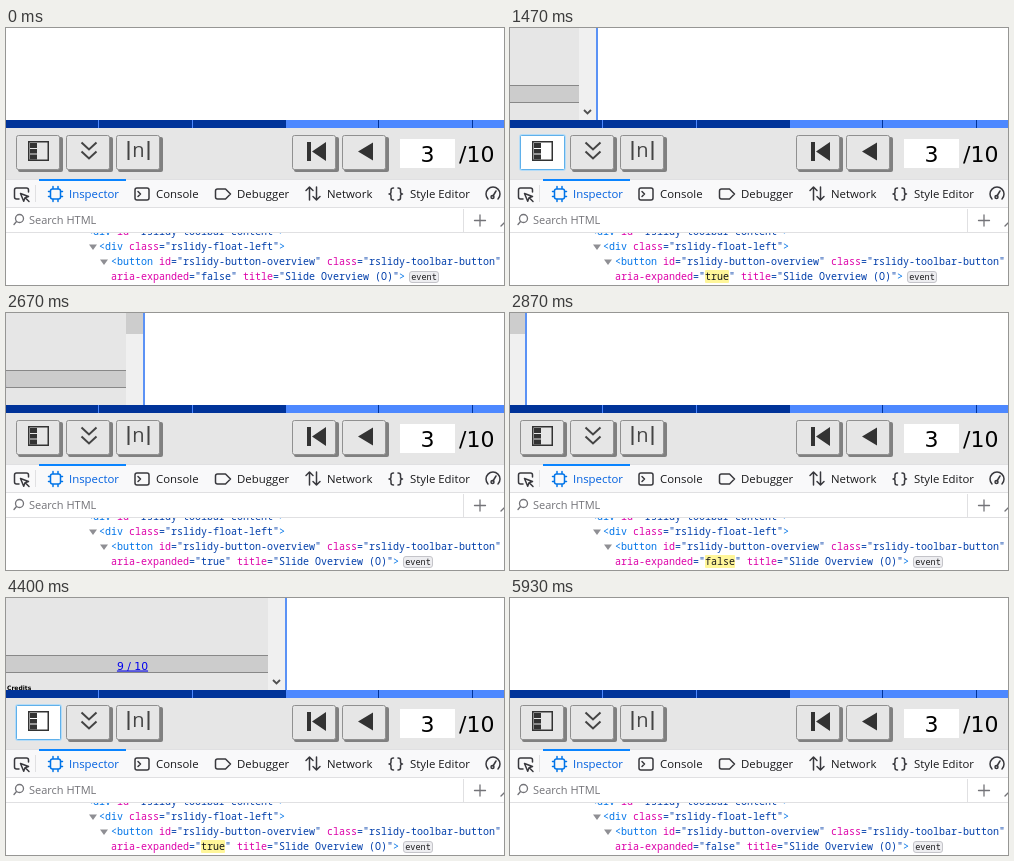
Recreate the animation shown at these times as an HTML page. Size 498 px wide and 257 px high, loop 6.59 s.

```html
<!DOCTYPE html>
<html lang="en">
<head>
<meta charset="utf-8">
<title>Slide overview toggle</title>
<style>
html, body { margin: 0; height: 100%; overflow: hidden; background: #fff; }
svg { display: block; width: 100%; height: 100%; }
.big { font: 22px "DejaVu Sans", sans-serif; }
.ui { font: 11.4px "Open Sans", sans-serif; fill: #18181a; }
.code { font: 10px "Noto Sans Mono", monospace; fill: #003eaa; }
.tag { fill: #0074e8; }
.attr { fill: #dd00a9; }
.line { fill: none; stroke: #38383d; stroke-width: 1.5; stroke-linecap: round; stroke-linejoin: round; }
.glyph { fill: none; stroke: #444; stroke-width: 2; }
</style>
</head>
<body>
<svg viewBox="0 0 498 257">
  <rect width="498" height="257" fill="#fff"/>

  <!-- slide overview panel -->
  <g id="panel">
    <rect width="271" height="92" fill="#e6e6e6"/>
    <rect y="57" width="271" height="18" fill="#888"/>
    <rect y="58" width="271" height="16" fill="#ccc"/>
    <text x="135.5" y="71.5" text-anchor="middle" fill="#00e" text-decoration="underline"
      style="font:10.8px 'DejaVu Sans',sans-serif">9 / 10</text>
    <text x="10" y="92" style="font:bold 6px 'DejaVu Sans',sans-serif">Credits</text>
    <rect x="271" width="17" height="92" fill="#f0f0f0"/>
    <path id="arrow" d="M276 82l3.5 3.5 3.5-3.5" fill="none" stroke="#505050" stroke-width="1.8"/>
    <rect id="thumb" x="271" width="17" height="21" fill="#cdcdcd"/>
    <rect x="288" width="2" height="92" fill="#5b92f5"/>
  </g>

  <!-- progress bar and slide toolbar -->
  <rect y="92" width="498" height="8" fill="#4d88ff"/>
  <rect y="92" width="280" height="8" fill="#039"/>
  <path d="M92.5 92v8M186.5 92v8" stroke="#4d88ff"/>
  <path d="M372.5 92v8M466.5 92v8" stroke="#039"/>
  <rect y="100" width="498" height="51" fill="#e6e6e6"/>
  <g id="buttons"></g>
  <g id="active">
    <rect x="8" y="105" width="50" height="40" fill="#e6e6e6"/>
    <rect x="9" y="106" width="47" height="37" rx="3" fill="#b5dcf7"/>
    <rect x="10.5" y="107.5" width="44" height="34" rx="1" fill="#fff" stroke="#5fb0ea"/>
  </g>
  <rect x="22.75" y="113.75" width="19.5" height="18.5" fill="none" stroke="#333" stroke-width="1.5"/>
  <path d="M24 115h7v5h-7zM24 121h7v4.500h-7zM24 126.500h7v5h-7z" fill="#333"/>
  <path class="glyph" d="M75.500 114.500l7.500 7 7.500-7M75.500 123.500l7.500 7 7.500-7"/>
  <path class="glyph" stroke-width="1.6" d="M122.500 113v19M142.500 113v19"/>
  <text x="132.500" y="129" text-anchor="middle" fill="#444" style="font:20px 'Open Sans',sans-serif">n</text>
  <path d="M301 114h4v19h-4zM320 114v19l-14-9.500zM367 114.500v18l-15-9z" fill="#333"/>
  <rect x="394" y="111" width="55" height="29" fill="#fff"/>
  <text class="big" x="421.500" y="134" text-anchor="middle">3</text>
  <text class="big" x="453" y="134">/10</text>

  <!-- markup tree -->
  <g id="tree">
    <path d="M83 216.500h8l-4 5.500zM94 231.500h8l-4 5.500z" fill="#8f8f94"/>
    <rect id="flash" x="195" y="242" height="13" rx="1" fill="#fff699"/>
  </g>
  <g id="badge">
    <rect x=".5" y="243.500" width="29" height="11" rx="2.500" fill="#ededf0" stroke="#c4c4c9"/>
    <text x="15" y="251.500" text-anchor="middle" fill="#18181a"
      style="font:8.500px 'Noto Sans Mono',monospace">event</text>
  </g>

  <!-- developer tool bars -->
  <rect y="151" width="498" height="54" fill="#f9f9fa"/>
  <rect y="180" width="498" height="24" fill="#fff"/>
  <path d="M0 151.500h498M0 179.500h498M0 204.500h498M29.500 157v17M457.500 181v23" stroke="#e0e0e2"/>
  <rect x="33" y="151" width="87" height="2" fill="#0a84ff"/>
  <g id="tabs"></g>
  <g class="line">
    <path d="M13 171h-2.500a2 2 0 0 1-2-2v-7a2 2 0 0 1 2-2h10a2 2 0 0 1 2 2v2"/>
    <path d="M14.500 165.500l8 3-3.500 1.300-1.300 3.500zM19.500 170l3.500 3.500"/>
    <g stroke="#0074e8">
      <rect x="44.500" y="161" width="10" height="10" rx="2"/>
      <path d="M47 158.500v2M52 158.500v2M47 171.500v2M52 171.500v2M42.500 163.500h1.500M42.500 168.500h1.500M55 163.500h1.500M55 168.500h1.500"/>
    </g>
    <rect x="129" y="160" width="14" height="12" rx="2"/>
    <path d="M132 163.500l2.500 2.500-2.500 2.500"/>
    <path d="M211.500 161h8l5 5-5 5h-8a2 2 0 0 1-2-2v-6a2 2 0 0 1 2-2z"/>
    <path d="M303.500 172v-13l-3.500 3.500M303.500 159l3.500 3.500M310.500 159v13l-3.500-3.500M310.500 172l3.500-3.500"/>
    <path d="M387.500 160q-2.500 0-2.500 2v2q0 2-2 2 2 0 2 2v2q0 2 2.500 2M392 160q2.500 0 2.500 2v2q0 2 2 2-2 0-2 2v2q0 2-2.500 2"/>
    <path d="M482 171a7 7 0 1 1 10 0M487 168l3-5"/>
    <circle cx="486.500" cy="169" r="1.500"/>
    <g stroke="#737378" stroke-width="1.300">
      <circle cx="13.500" cy="190.500" r="4"/>
      <path d="M10.500 193.500l-2.500 3M468.500 192.500h11M474 187v11M495 198l3-3"/>
    </g>
  </g>
  <text class="ui" x="23" y="196" style="font-size:11px;fill:#737378">Search HTML</text>
</svg>
<script>
const $ = id => document.getElementById(id);

$("buttons").innerHTML = [10, 60, 110, 286, 336].map(x =>
  `<rect x="${x + 2}" y="109" width="45" height="35" rx="2" fill="#808080"/>
   <rect x="${x + .5}" y="107.5" width="43" height="34" rx="2" fill="#e6e6e6" stroke="#909090"/>`).join("");

$("tabs").innerHTML = [["Inspector", 63], ["Console", 150], ["Debugger", 231], ["Network", 321], ["Style Editor", 404]]
  .map(([name, x], i) => `<text class="ui" x="${x}" y="170"${i ? "" : ' style="fill:#0060df"'}>${name}</text>`).join("");

const span = (cls, s) => `<tspan class="${cls}">${s}</tspan>`;
const attr = (name, value) => span("attr", name) + `="${value}"`;
const row = (x, y, s) => `<text class="code" x="${x}" y="${y}">${s}</text>`;
const open = span("tag", "&lt;div") + " ", close = span("tag", "&gt;");
$("tree").innerHTML +=
  row(81, 207, open + attr("id", "rslidy-toolbar-content") + close) +
  row(93, 222, open + attr("class", "rslidy-float-left") + close) +
  row(105, 237, span("tag", "&lt;button") + " " + attr("id", "rslidy-button-overview") + " " + attr("class", "rslidy-toolbar-button")) +
  row(105, 251.5, attr("aria-expanded", '<tspan id="value"></tspan>') + " " + attr("title", "Slide Overview (O)") + close);

// The CSS "ease" curve
function ease(x) {
  const bez = (a, b, u) => 3 * a * u * (1 - u) ** 2 + 3 * b * u * u * (1 - u) + u ** 3;
  let lo = 0, hi = 1;
  for (let i = 0; i < 24; i++) {
    const mid = (lo + hi) / 2;
    if (bez(.25, .25, mid) < x) lo = mid; else hi = mid;
  }
  return bez(.1, 1, lo);
}

const LOOP = 6590, STEP = 200 / 3, SLIDE = 500, WIDTH = 290, FLASH = 7;
// Each toggle: first visible step, step of the attribute change, start of the slide in ms
const toggles = [[20, 21, 1365], [40, 41, 2515], [61, 61, 4013], [82, 82, 5417]];
const show = (id, on) => $(id).setAttribute("visibility", on ? "visible" : "hidden");

function draw(ms) {
  const step = Math.floor((ms % LOOP + 4) / STEP);
  const past = toggles.filter(g => step >= g[0]);
  const changed = toggles.filter(g => step >= g[1]);
  const opened = past.length % 2 === 1;

  const start = past.length ? past[past.length - 1][2] : -SLIDE;
  const p = ease(Math.min(1, Math.max(0, (step * STEP - start) / SLIDE)));
  $("panel").setAttribute("transform", `translate(${-Math.round(WIDTH * (opened ? 1 - p : p))})`);
  show("active", opened);
  show("arrow", opened);
  show("thumb", !opened);

  const value = String(changed.length % 2 === 1);
  const lit = changed.length > 0 && step < changed[changed.length - 1][1] + FLASH;
  $("value").textContent = value;
  $("value").style.fill = lit ? "#18181a" : "";
  $("flash").setAttribute("width", 6 * value.length);
  show("flash", lit);
  $("badge").setAttribute("transform", `translate(${373 + 6 * value.length})`);
}

const t0 = performance.now();
function tick() {
  draw(performance.now() - t0);
  requestAnimationFrame(tick);
}
draw(0);
requestAnimationFrame(tick);
</script>
</body>
</html>
```
